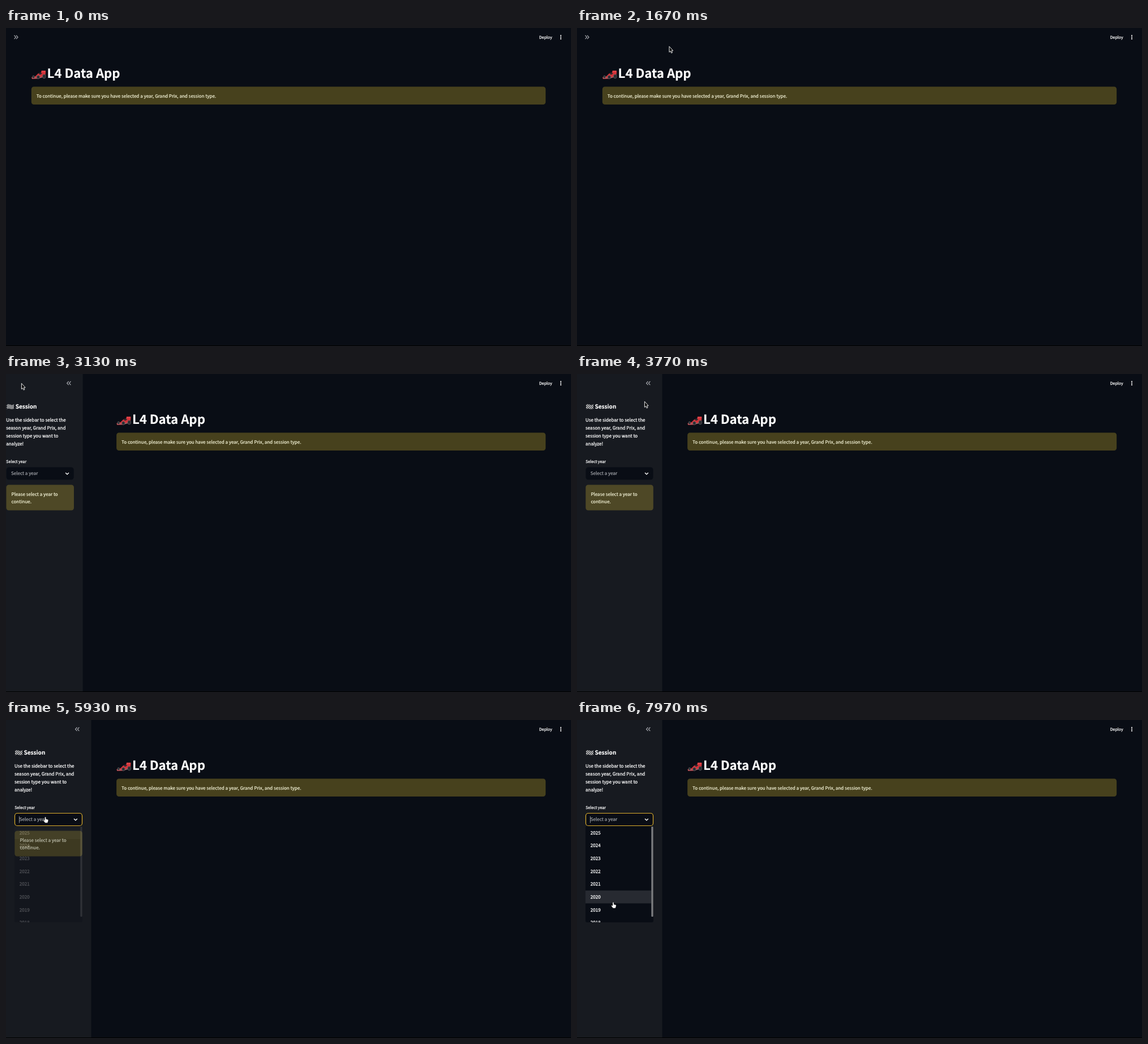
Recreate the animation shown at these times as an HTML page. Size 998 by 561 pixels, loop 8 s.

```html
<!DOCTYPE html>
<html lang="en">
<head>
<meta charset="utf-8">
<style>
  html, body { margin: 0; width: 100%; height: 100%; overflow: hidden; background: #090d15; }
  svg { display: block; width: 100%; height: 100%; }
  text {
    font: 8.05px "Noto Sans CJK JP", "Noto Sans CJK SC", "Noto Sans", sans-serif;
    fill: #fafafa; stroke: #fafafa; stroke-width: .18; text-rendering: geometricPrecision;
  }
  .title { font-size: 22.15px; font-weight: 700; fill: #fff; }
  .heading { font-size: 10.05px; font-weight: 700; }
  .label { font-size: 7.03px; stroke-width: .25; }
  .body { stroke-width: .28; }
  .warn { fill: #ffffe3; stroke: #ffffe3; }
  .hint { fill: #a9abb0; stroke: #a9abb0; }
  .line { fill: none; stroke: #b0b2b8; stroke-width: 1.1; }
</style>
</head>
<body>
<svg viewBox="0 0 998 561">
  <defs>
    <clipPath id="listClip"><rect x="15" y="187" width="120" height="170" rx="3"/></clipPath>
    <clipPath id="flagClip"><path d="M16 54.3Q19.5 52.5 22.5 54T29 53.5V61Q26 62.6 22.5 61.4T16 62Z"/></clipPath>
    <pattern id="checks" x="16" y="53" width="3.4" height="3.4" patternUnits="userSpaceOnUse">
      <path d="M0 0h3.4v3.4H0z" fill="#e8e8e8"/>
      <path d="M0 0h1.7v3.4h1.7V1.7H0z" fill="#24262a"/>
    </pattern>
  </defs>
  <rect width="998" height="561" fill="#090d15"/>

  <rect id="hover" x="10" y="8" width="15.5" height="16" rx="4" fill="#20232b"/>
  <path id="expand" class="line" d="M14.5 13l3 3.2-3 3.2M18 13l3 3.2-3 3.2"/>
  <text class="label" x="941.7" y="19">Deploy</text>
  <g fill="#fafafa">
    <circle cx="980" cy="13.4" r="1.1"/><circle cx="980" cy="16.3" r="1.1"/><circle cx="980" cy="19.2" r="1.1"/>
  </g>

  <rect id="banner" y="103.5" height="31.5" rx="4.5" fill="#47411d"/>
  <g id="main">
    <g id="car">
      <path d="M45 87l7-2 5-5 5-1.5 1-3h7v4l-1 6-6 2-6 2-11 .5z" fill="#d3333a"/>
      <path d="M62.5 75.5h7.3v2.3h-7.3z" fill="#e8474b"/>
      <path d="M57 80l4-1.5 3 2-4 2z" fill="#29292e"/>
      <path d="M46 88.5l13-.8 9-2" stroke="#85868a" fill="none"/>
      <g fill="#2b2b2f" stroke="#69696d" stroke-width=".7">
        <ellipse cx="48.500" cy="86.3" rx="1.8" ry="2.3"/>
        <ellipse cx="57" cy="86.7" rx="2.7" ry="3"/>
        <ellipse cx="67.3" cy="85.4" rx="2.7" ry="3.6"/>
      </g>
    </g>
    <text class="title" x="72.600" y="88">L4 Data App</text>
    <text class="warn" x="53.7" y="122.7">To continue, please make sure you have selected a year, Grand Prix, and session type.</text>
  </g>

  <g id="sidebar">
    <rect width="150.5" height="561" fill="#171a20"/>
    <path class="line" d="M125.5 13l-3 3.2 3 3.2M129.3 13l-3 3.2 3 3.2"/>
    <rect x="16" y="52" width="13" height="11" fill="url(#checks)" clip-path="url(#flagClip)"/>
    <text class="heading" x="31.5" y="61.3">Session</text>
    <g id="intro"></g>
    <text class="label" x="15.2" y="157.2">Select year</text>
    <rect id="select" x="15.5" y="164.5" width="119" height="22" rx="4.5" fill="#090d15" stroke-width="1.2"/>
    <text class="hint" x="23.8" y="178.4">Select a year</text>
    <path d="M120 174.2l2.9 2.9 2.9-2.9" fill="none" stroke="#fafafa" stroke-width="1.4"/>
    <rect x="15.3" y="195.5" width="119.5" height="45" rx="4.5" fill="#4e4826"/>
    <text class="warn" x="24.4" y="214.6">Please select a year to</text>
    <text class="warn" x="24.4" y="228.1">continue.</text>
    <path id="caret" d="M23.5 170v11.5" stroke="#b4b6ba" stroke-width=".8"/>
    <g id="list" clip-path="url(#listClip)">
      <rect x="15" y="187" width="120" height="170" fill="#090d15"/>
      <rect id="active" x="15" width="116.5" height="22.7" fill="#272a31"/>
      <g id="years"></g>
      <rect x="131.3" y="188" width="3.3" height="159" rx="1" fill="#7c7d7f"/>
    </g>
  </g>

  <rect y="560" width="998" height="1" fill="#000"/>
  <g id="cursor">
    <path id="arrow" d="M.4.5V10.7L2.6 8.7 4.1 12.2 5.9 11.4 4.4 8H7.2Z" fill="#0a0a0a" stroke="#fff" stroke-width=".9"/>
    <path id="hand" d="M-1.5 5.6V1a1 1 0 0 1 2 0V3.7L3.6 4.400q1.300.3 1.100 1.700L4.100 8.600 3.300 10.400H-.9L-3.500 7q-.9-1.300.2-1.600.9-.1 1.800.8z" fill="#fff" stroke="#111" stroke-width=".4"/>
  </g>
</svg>
<script>
const LOOP = 8000, ENTER = 570, EXPAND = 2870, OPEN = 5930;
const ROW_TOP = 187.3, ROW_HEIGHT = 22.7, SIDEBAR = 150.5;
const $ = id => document.getElementById(id);
const show = (id, on) => $(id).style.display = on ? "" : "none";
const clamp = v => Math.min(1, Math.max(0, v));

// time, x, y, ease-out power of the move that ends here
const path = [
  [570, 673, 0, 1], [1070, 441, 37, 2], [1330, 441, 37, 1],
  [1670, 163, 32, 1.1], [2130, 59, 27, 2], [2170, 57, 26.5, 1],
  [2530, 29, 18, 1.6], [2730, 27, 16, 1.5], [3190, 27, 16, 1],
  [3670, 117, 45, 1.6], [3770, 119, 48, 1], [4030, 119, 48, 1],
  [4280, 131, 76, 1], [4830, 82, 134, 1.8], [5230, 82, 134, 1],
  [5670, 70, 171, 1.8], [6370, 70, 171, 1], [6630, 95.3, 204, 1.2],
  [6730, 131, 208, 1.5], [6870, 131, 208, 1], [7230, 100, 208, 1.8],
  [7430, 100, 208, 1], [7970, 64.5, 321.5, 1.6]
];

function pointer(t) {
  const next = path.findIndex(key => key[0] > t);
  if (next < 1) return path[next ? path.length - 1 : 0].slice(1, 3);
  const [t0, x0, y0] = path[next - 1], [t1, x1, y1, power] = path[next];
  const k = 1 - (1 - (t - t0) / (t1 - t0)) ** power;
  return [x0 + (x1 - x0) * k, y0 + (y1 - y0) * k];
}

$("intro").innerHTML = ["Use the sidebar to select the", "season year, Grand Prix, and", "session type you want to", "analyze!"]
  .map((line, i) => `<text class="body" x="15" y="${83.9 + 14 * i}">${line}</text>`).join("");
$("years").innerHTML = Array.from({ length: 8 }, (_, i) =>
  `<text class="body" x="23.8" y="${201.5 + ROW_HEIGHT * i}">${2025 - i}</text>`).join("");

function draw(t) {
  const expanded = t >= EXPAND, open = t >= OPEN;
  const [x, y] = pointer(t);

  const shift = expanded ? 150.3 : 0;
  $("main").setAttribute("transform", `translate(${shift})`);
  $("banner").setAttribute("x", 44.8 + shift);
  $("banner").setAttribute("width", 908.4 - shift);
  show("expand", !expanded);
  show("hover", !expanded && t >= 2610);

  const hidden = (1 - clamp((t - EXPAND) / 485)) ** 3;
  show("sidebar", expanded);
  $("sidebar").setAttribute("transform", `translate(${-SIDEBAR * hidden})`);

  $("select").setAttribute("stroke", open ? "#dcae2c" : "none");
  show("caret", open && (t - OPEN) % 1000 < 500);
  show("list", open);
  $("list").style.opacity = clamp((t - OPEN + 30) / 130);
  const row = Math.max(0, Math.floor((y - ROW_TOP) / ROW_HEIGHT));
  $("active").setAttribute("y", ROW_TOP + ROW_HEIGHT * row);

  const overSelect = y > 164;
  show("cursor", t >= ENTER);
  show("arrow", !overSelect);
  show("hand", overSelect);
  $("cursor").setAttribute("transform", `translate(${x} ${y})`);
}

function tick() {
  draw(performance.now() % LOOP);
  requestAnimationFrame(tick);
}
tick();
</script>
</body>
</html>
```
